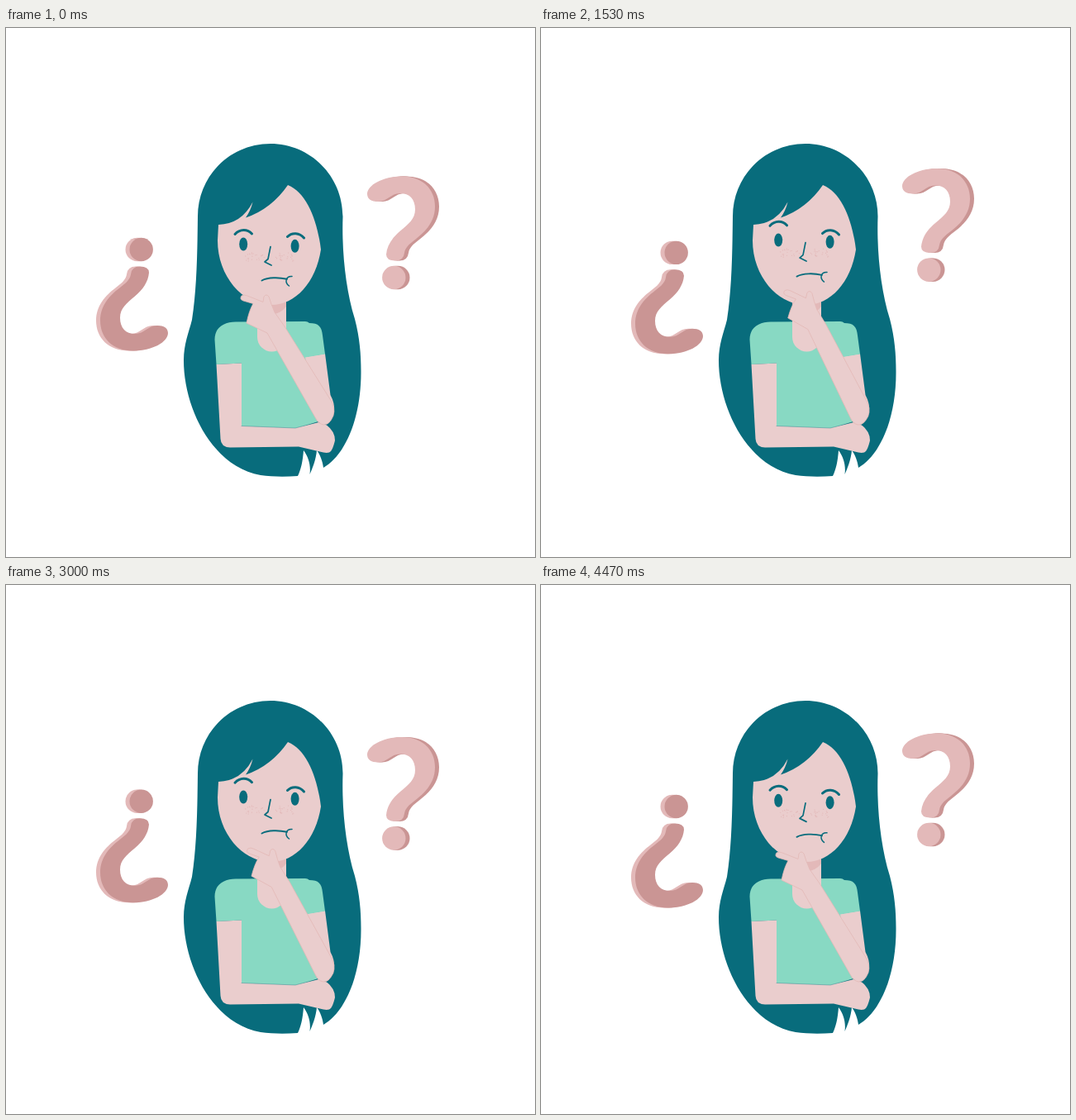
Write an HTML page that moves like this. It is 640 px wide and 640 px high and loops after 4530 ms.

```html
<!DOCTYPE html>
<html lang="en">
<head>
<meta charset="utf-8">
<title>Thinking</title>
<style>
  html, body { margin: 0; width: 100%; height: 100%; overflow: hidden; background: #fff; }
  svg { display: block; width: 100vw; height: 100vh; }
  .hair { fill: #086c7c; }
  .skin { fill: #eacdcd; }
  .rose { fill: #e3b9b9; }
  .dark { fill: #ca9594; }
  .mint { fill: #88d9c3; }
  .line { fill: none; stroke: #086c7c; stroke-linecap: round; stroke-linejoin: round; }
</style>
</head>
<body>
<svg viewBox="0 0 640 640">
  <defs>
    <g id="mark">
      <path d="M437 201 C437 190 456 179.500 479 179.500 C504 179.500 519 195 519 216 C519 234 508 246 495 256 C487 262 483 266 482 272 Q481 281.500 471 281.500 Q460 281.500 460 274 C461 263 467 254 477 245.500 C487 237 495 231 495 219.500 C495 207 488 200 477 200 C465 200 462 210 450 210 Q437.500 210 437 201 Z"/>
      <circle cx="469.300" cy="302" r="14.200"/>
    </g>
  </defs>

  <g id="right">
    <use href="#mark" x="5" class="dark"/>
    <use href="#mark" x="2.500" class="dark"/>
    <use href="#mark" class="rose"/>
  </g>
  <g id="left">
    <g transform="rotate(180 316.500 285)">
      <use href="#mark" x="5" class="rose"/>
      <use href="#mark" x="2.500" class="rose"/>
      <use href="#mark" class="dark"/>
    </g>
  </g>

  <path class="hair" d="M320 140 C368 140 407.500 179 407.500 228 C406 270 411 317 422 352 C428 375 429.500 395 429.500 415 C430 466 414 514 384 532 C383 524 380 516 376 511 C375 522 371 532 367.500 540 C369 529 366 519 360 511 C359 524 357 534 353 542 C338 543 322 543 308 541 C250 531 215 460 215 402 C215 382 221 369 225 353 C231 315 231.500 270 232 228 C232 179 271 140 320 140 Z"/>

  <path class="skin" d="M304 325 H339 V360 H304 Z"/>
  <path class="rose" d="M304 325 H339 V337 Q333 345 321 347 H304 Z"/>
  <path class="skin" d="M257 238 Q285 237 298.500 210.500 Q296 221 290 229.500 Q321 219 341 190 C364 199 377 234 381 268 C375 308 350 335 321 335 C286 335 256 300 256 257 Z"/>

  <g id="face">
    <g id="freckles" class="rose"></g>
    <g class="hair">
      <ellipse cx="287.200" cy="261.500" rx="5" ry="8"/>
      <ellipse cx="349.600" cy="263.800" rx="5" ry="8"/>
    </g>
    <path class="line" stroke-width="1.700" d="M320 264.500 L317 279.500 L313 283 L321 287"/>
    <path class="line" stroke-width="1.900" d="M309.500 305.500 C317 301.500 330 301.500 340 303.800"/>
    <path class="line" stroke-width="1.500" d="M346 300.500 C338 300 337 308 342.500 312"/>
  </g>
  <path id="browLeft" class="line" stroke-width="3" d="M277 249.500 C283 243 292 243 297.500 249"/>
  <path id="browRight" class="line" stroke-width="3" d="M340.500 252.500 C346 247 355 247.500 360.500 254"/>

  <path class="skin" d="M361 398 L386 394 L392.500 444 Q398 454 397 464 Q395 474 388 479 L372 470 Z"/>
  <path class="mint" d="M252.500 377 C252.500 362 264 355.500 278 355.500 L362 355 Q365 355 367 357 C378 357 382 361 383 372 L386 394.500 L362 398.500 L378 476 L350 485 L285 482 V405.500 L254.500 407 Z"/>
  <path class="skin" d="M304 354 H339 V374 A17.500 17.500 0 0 1 304 374 Z"/>
  <path class="skin" d="M254.500 407 L285 405.500 V481.500 L350 484 L378 477 L388 480.500 Q398 488 398 499 Q395 512 391 513.500 Q388 514.300 384 513.500 L354 506.500 L271 507.500 Q260 507 259.500 497 Z"/>
  <path class="line" stroke-width=".7" opacity=".5" d="M285 481.500 L350 484 L377 477"/>
  <path id="arm" class="skin" stroke="#e3b9b6" stroke-width=".8" d="M285 324 Q288 322 292 324 L311 331.500 L312 325 Q315 321 318 325 Q321 335 325 344 L337 361 L392 449 Q399 459 396 469 Q391 481 384 480 Q378 479 374 471 L316 369 L291 357 Q294 342 299 333.500 L287 330 Q282 328 285 324 Z"/>
</svg>

<script>
  const STEP = 30, LOOP = 4530, LAST = 149;

  // Each track is a list of [step, value] keys, eased in and out.
  const tracks = {
    right: [[0, 0], [30, 11], [60, -15], [90, 10], [120, -11.5], [150, 0]],
    left: [[0, 0], [30, -13], [60, 8.5], [90, -12], [120, 10.3], [150, 0]],
    face: [[0, 0], [15, 1], [50, 1], [68, 0], [75, 0], [90, 1], [135, 1], [153, 0]],
    arm: [[0, 0], [65, 4.5], [75, 4.5], [142, 0], [150, 0]]
  };

  const $ = id => document.getElementById(id);
  const ease = u => u * u * (3 - 2 * u);

  function sample(keys, n) {
    const i = keys.findIndex(k => k[0] > n);
    const [a, from] = keys[i - 1], [b, to] = keys[i];
    return from + (to - from) * ease((n - a) / (b - a));
  }

  function addFreckles() {
    let seed = 7;
    const rand = () => (seed = seed * 16807 % 2147483647) / 2147483647;
    let dots = '';
    for (const cx of [299, 338]) {
      for (let i = 0; i < 24; i++) {
        const a = rand() * Math.PI * 2, r = Math.sqrt(rand());
        const x = cx + 14 * r * Math.cos(a), y = 277.5 + 6 * r * Math.sin(a);
        dots += `<circle cx="${x.toFixed(1)}" cy="${y.toFixed(1)}" r=".6"/>`;
      }
    }
    $('freckles').innerHTML = dots;
  }

  const shift = (id, y) => $(id).setAttribute('transform', `translate(0 ${y})`);

  function draw(now) {
    const n = Math.min(LAST, Math.floor(now % LOOP / STEP));
    const lift = sample(tracks.face, n);
    shift('right', sample(tracks.right, n));
    shift('left', sample(tracks.left, n));
    shift('face', -5 * lift);
    shift('browLeft', -10.3 * lift);
    shift('browRight', -4 * lift);
    $('arm').setAttribute('transform', `rotate(${sample(tracks.arm, n)} 384 466)`);
  }

  addFreckles();
  draw(0);
  const start = performance.now();
  (function tick() {
    draw(performance.now() - start);
    requestAnimationFrame(tick);
  })();
</script>
</body>
</html>
```
